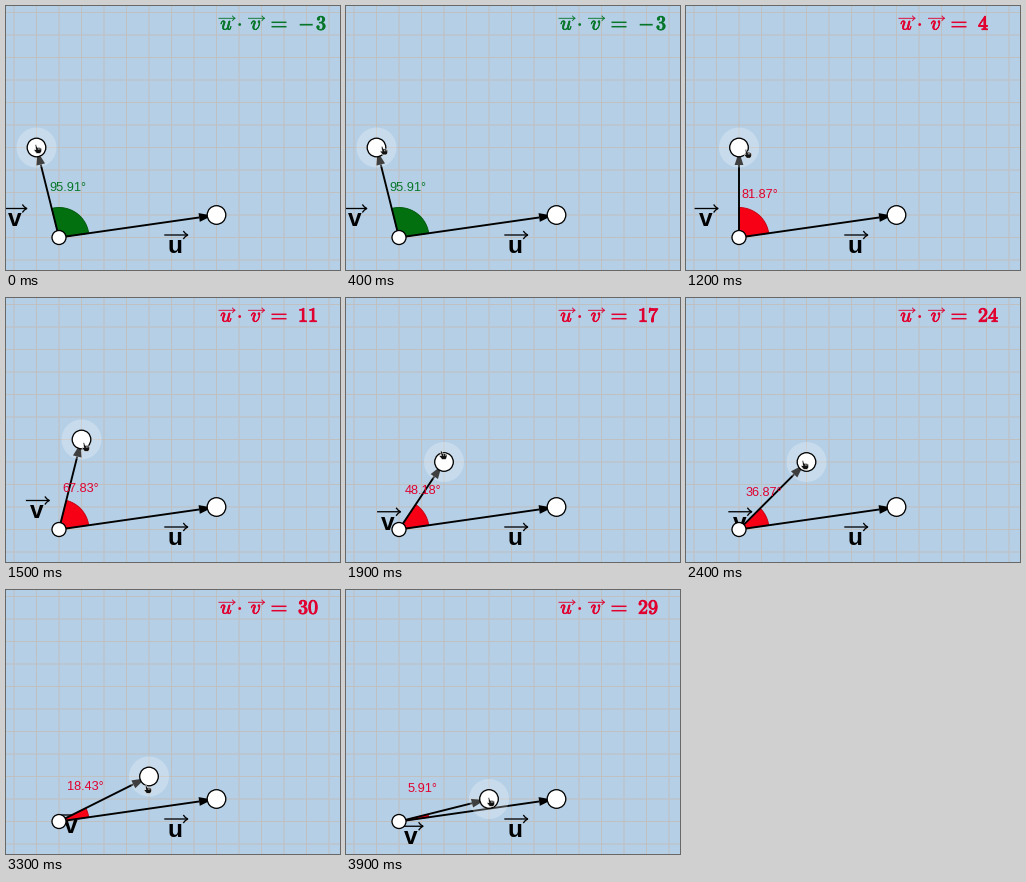
A matplotlib script that plays this animation: 334x264 px, repeating every 4 s.

```python
import math

import matplotlib.pyplot as plt
import numpy as np
from matplotlib.animation import FuncAnimation
from matplotlib.patches import Circle, Polygon
from matplotlib.patheffects import withStroke

W, H, DPI = 334, 264, 100
FRAMES, STEP = 40, 100
PT = 72 / DPI
UNIT = 22.5
OX, OY = 53, 231.5
ARC = 30
U = (7, 1)
RED, GREEN = "#e1002f", "#08762a"
RED_FILL, GREEN_FILL = "#f70016", "#02700f"

# Pointer path: times in ms, positions in pixels
X_KEYS = ([0, 700, 800, 1200, 1300, 1500, 2400, 2900, 3300, 3900],
          [32, 42.8, 47, 62, 67, 80, 119, 133, 142, 145])
Y_KEYS = ([0, 800, 1500, 2400, 2900, 3300, 3900],
          [143, 146, 149, 167, 180, 199, 212])
HAND = np.array([(-3, -4.2), (-1.6, -4.2), (-0.8, -1.6), (1.5, -1.6),
                 (3.6, -0.4), (3.6, 2.2), (2.4, 4.4), (-1.4, 4.4),
                 (-4, 1.2), (-3.6, 0.2), (-2, 0.8)])

fig = plt.figure(figsize=(W / DPI, H / DPI), dpi=DPI, facecolor="#b5d0e6")
ax = fig.add_axes([0, 0, 1, 1])
ax.set_xlim(0, W)
ax.set_ylim(H, 0)
ax.axis("off")


def line(xs, ys, width, z, color="black"):
    return ax.plot(xs, ys, color=color, lw=width * PT, zorder=z,
                   solid_capstyle="butt", snap=False)[0]


def text(x, y, s, size, z=8, **kw):
    return ax.text(x, y, s, fontsize=size * PT, va="baseline", zorder=z, **kw)


def embolden(glyph, width, color):
    glyph.set_color(color)
    glyph.set_path_effects([withStroke(linewidth=width * PT,
                                       foreground=color)])


def disc(x, y, r, z):
    return ax.add_patch(Circle((x, y), r, fc="white", ec="black",
                               lw=1.3 * PT, zorder=z))


def to_px(v):
    return OX + UNIT * v[0], OY - UNIT * v[1]


class Arrow:
    """Vector from the common start point with a solid head."""

    def __init__(self):
        self.shaft = line([], [], 1.9, 4)
        self.head = ax.add_patch(Polygon([(0, 0)] * 3, fc="black", lw=0,
                                         zorder=4))

    def point(self, v):
        end = np.array(to_px(v))
        d = end - (OX, OY)
        d /= np.hypot(*d)
        side = np.array([-d[1], d[0]]) * 4.4
        tip, base = end - 4 * d, end - 17.5 * d
        self.shaft.set_data([OX, base[0]], [OY, base[1]])
        self.head.set_xy([tip, base + side, base - side])


class Over:
    """Right arrow above a letter, centred on a place."""

    def __init__(self, half, barb, width, z):
        self.half, self.barb = half, barb
        self.lines = [line([], [], width, z) for _ in range(2)]

    def place(self, x, y):
        end, b = x + self.half, self.barb
        self.lines[0].set_data([x - self.half, end], [y, y])
        self.lines[1].set_data(
            [end - 1.1 * b, end - 0.6 * b, end, end - 0.6 * b, end - 1.1 * b],
            [y - b, y - 0.4 * b, y, y + 0.4 * b, y + b])

    def paint(self, color):
        for part in self.lines:
            part.set_color(color)


def name(letter):
    glyph = text(0, 0, letter, 24.5, 2, ha="center", weight="bold",
                 family="Liberation Sans")
    return glyph, Over(11.7, 4, 1.3, 2)


def put_name(label, x, y):
    label[0].set_position((x - 0.8, y + 18))
    label[1].place(x, y)


# Grid
for k in range(-3, 14):
    gx, gy = to_px((k, k))
    line([gx, gx], [0, H], 1, 1, "#c0c0c0")
    line([0, W], [gy, gy], 1, 1, "#c0c0c0")

# Vectors, angle and points
u_name, v_name = name("u"), name("v")
put_name(u_name, 170, 229)
u_arrow, v_arrow = Arrow(), Arrow()
u_arrow.point(U)
wedge = ax.add_patch(Polygon([(0, 0)] * 3, lw=0.9 * PT, zorder=3))
halo = ax.add_patch(Circle((0, 0), 20, fc="white", alpha=0.25, lw=0, zorder=5))
disc(OX, OY, 7, 6)
disc(*to_px(U), 9.3, 6)
v_disc = disc(0, 0, 9.3, 6)
degrees = text(0, 0, "", 12.7, family="Liberation Sans")
hand = ax.add_patch(Polygon(HAND, fc="#111111", ec="white", lw=0.5 * PT,
                            zorder=9))
knuckles = [line([], [], 0.6, 10, "white") for _ in range(2)]

# Dot product formula
CM = dict(math_fontfamily="cm")
letters = [text(x, 23.7, s, 20, ha="center", **CM)
           for x, s in ((220.7, "$u$"), (250.2, "$v$"))]
overs = [Over(8.3, 2.6, 0.9, 8) for _ in range(2)]
overs[0].place(220.8, 12.3)
overs[1].place(250.3, 12.3)
dot = ax.add_patch(Circle((233.7, 18.5), 1.4, lw=0, zorder=8))
bars = [line([265.5, 280.5], [y, y], 1.5, 8) for y in (16.3, 20.7)]
minus = line([293.7, 306.7], [18.7, 18.7], 1.7, 8)
value = text(0, 0, "", 20, **CM)


def show_product(n, color):
    for glyph in letters:
        embolden(glyph, 0.7, color)
    for part in overs:
        part.paint(color)
    dot.set_facecolor(color)
    for part in bars + [minus]:
        part.set_color(color)
    minus.set_visible(n < 0)
    value.set_text(r"$\mathbf{%d}$" % abs(n))
    value.set_position((310 if n < 0 else 292, 23.7))
    embolden(value, 1, color)


def show_angle(v, obtuse, color):
    a, b = math.atan2(U[1], U[0]), math.atan2(v[1], v[0])
    arc = np.linspace(a, b, 40)
    rim = np.column_stack((OX + ARC * np.cos(arc), OY - ARC * np.sin(arc)))
    wedge.set_xy(np.vstack(([OX, OY], rim)))
    wedge.set_facecolor(GREEN_FILL if obtuse else RED_FILL)
    wedge.set_edgecolor("#00580d" if obtuse else "#c80010")
    mid, r = (a + b) / 2, ARC / 1.7
    dx, dy = (-10, -6) if obtuse else (0, 0)
    degrees.set_position((43.7 + r * math.cos(mid) + dx,
                          205.6 - r * math.sin(mid) + dy))
    degrees.set_text(f"{math.degrees(b - a):.2f}°")
    degrees.set_color(color)


def update(i):
    t = i * STEP
    cx, cy = np.interp(t, *X_KEYS), np.interp(t, *Y_KEYS)
    # The dragged point snaps to the grid
    v = round((cx - 0.5 - OX) / UNIT), round((OY - cy + 4) / UNIT)
    px, py = to_px(v)
    product = U[0] * v[0] + U[1] * v[1]
    obtuse = product < 0
    color = GREEN if obtuse else RED

    v_arrow.point(v)
    halo.center = v_disc.center = px, py
    put_name(v_name, (OX + px) / 2 - 32.7, (OY + py) / 2 + 16)
    show_angle(v, obtuse, color)
    show_product(product, color)
    hand.set_xy(HAND + (cx, cy))
    for k, part in enumerate(knuckles):
        x = cx + 0.2 + 1.7 * k
        part.set_data([x, x], [cy - 0.8, cy + 0.8])
    return []


anim = FuncAnimation(fig, update, frames=FRAMES, interval=STEP,
                     init_func=lambda: update(0), repeat=True,
                     repeat_delay=0, blit=False)
plt.show()
```
